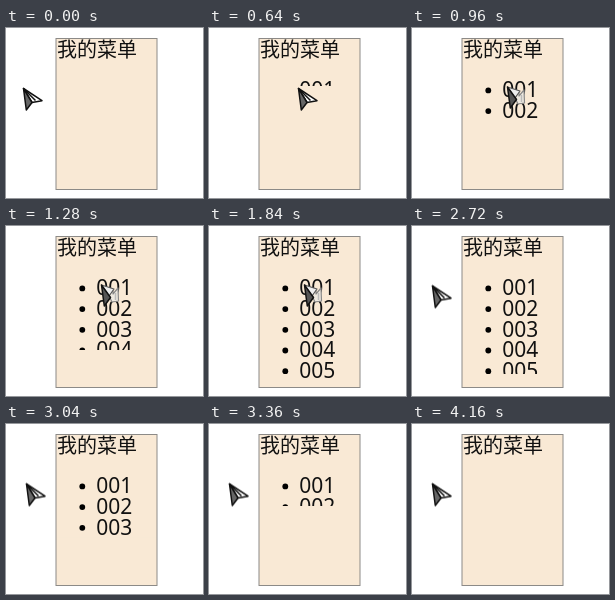
Write an HTML page that moves like this. It is 197 px wide and 170 px high and loops after 4.48 s.

```html
<!DOCTYPE html>
<html lang="zh">
<head>
<meta charset="utf-8">
<title>我的菜单</title>
<style>
  html, body { margin: 0; width: 100%; height: 100%; overflow: hidden; background: #fff; }
  svg { display: block; }
  text { fill: #111; }
  .title { font: 300 20px "Noto Sans CJK SC", "Noto Sans CJK", sans-serif; }
  .items { font: 300 21px "Noto Sans", sans-serif; }
  .cover, .cursor, .arrow, .hand { animation: 4480ms infinite; }
  .cover { animation-name: slide; }
  .cursor { animation-name: move; }
  .arrow { animation-name: swap; }
  .hand { animation-name: swap-back; }

  /* The menu advances in 80 ms ticks, so each stretch is stepped. */
  @keyframes slide {
    0% { transform: translateY(0); animation-timing-function: step-end; }
    10.714% { transform: translateY(0); animation-timing-function: steps(2); }
    14.285% { transform: translateY(7px); animation-timing-function: steps(4); }
    21.428% { transform: translateY(41px); animation-timing-function: steps(4); }
    28.571% { transform: translateY(73px); animation-timing-function: steps(3); }
    33.928% { transform: translateY(89px); animation-timing-function: steps(4); }
    41.071% { transform: translateY(104px); animation-timing-function: step-end; }
    51.785% { transform: translateY(104px); animation-timing-function: steps(5); }
    60.714% { transform: translateY(97px); animation-timing-function: steps(7); }
    73.214% { transform: translateY(36px); animation-timing-function: step-end; }
    75% { transform: translateY(31px); animation-timing-function: steps(6); }
    85.714% { transform: translateY(17px); animation-timing-function: steps(4); }
    92.857%, 100% { transform: translateY(0); }
  }
  @keyframes move {
    0% { transform: translate(17px, 60px); animation-timing-function: step-end; }
    8.928% { transform: translate(17px, 60px); animation-timing-function: steps(3); }
    14.285% { transform: translate(89px, 60px); animation-timing-function: steps(2); }
    17.857% { transform: translate(95px, 58px); animation-timing-function: step-end; }
    48.214% { transform: translate(95px, 58px); animation-timing-function: steps(4); }
    55.357%, 100% { transform: translate(20px, 59.5px); }
  }
  @keyframes swap {
    0%, 16.07% { opacity: 1; animation-timing-function: step-end; }
    16.071%, 49.999% { opacity: 0; animation-timing-function: step-end; }
    50%, 100% { opacity: 1; }
  }
  @keyframes swap-back {
    0%, 16.07% { opacity: 0; animation-timing-function: step-end; }
    16.071%, 49.999% { opacity: 1; animation-timing-function: step-end; }
    50%, 100% { opacity: 0; }
  }
</style>
</head>
<body>
<svg width="197" height="170" viewBox="0 0 197 170">
  <rect x="50" y="11" width="101" height="150" fill="#f9e9d5"/>
  <text class="title" x="51" y="28.5">我的菜单</text>

  <svg x="51" y="51" width="100" height="110">
    <g class="items">
      <circle cx="25.3" cy="11.4" r="2.9"/><text x="39.3" y="18.2">001</text>
      <circle cx="25.3" cy="32.1" r="2.9"/><text x="39.3" y="38.9">002</text>
      <circle cx="25.3" cy="52.8" r="2.9"/><text x="39.3" y="59.6">003</text>
      <circle cx="25.3" cy="73.5" r="2.9"/><text x="39.3" y="80.3">004</text>
      <circle cx="25.3" cy="94.2" r="2.9"/><text x="39.3" y="101">005</text>
    </g>
    <rect class="cover" width="100" height="110" fill="#f9e9d5"/>
  </svg>

  <rect x="50" y="10.5" width="101" height="151" fill="none" stroke="#8c8a87"/>

  <g class="cursor" stroke="#111" stroke-width="1.5" stroke-linejoin="round">
    <g class="arrow">
      <path d="M.5 .5 19 12.7 9 14.5Z" fill="#fff"/>
      <path d="M.5 .5 9 14.5 3.3 22Z" fill="#666"/>
      <path d="M1 1 12.5 12.5" fill="none"/>
    </g>
    <g class="hand">
      <path d="M8 7 12 6V10L17 4 17.5 17 11 18 8 12Z" fill="#eee9e0" stroke="#888" stroke-width="1.2"/>
      <path d="M14.5 9V16" fill="none" stroke="#bbb"/>
      <path d="M.5 1 13 5 8 12Z" fill="#eee" stroke="#555" stroke-width="1.2"/>
      <path d="M.5 1 9.5 13.5 3.3 22Z" fill="#555"/>
    </g>
  </g>
</svg>
</body>
</html>
```
